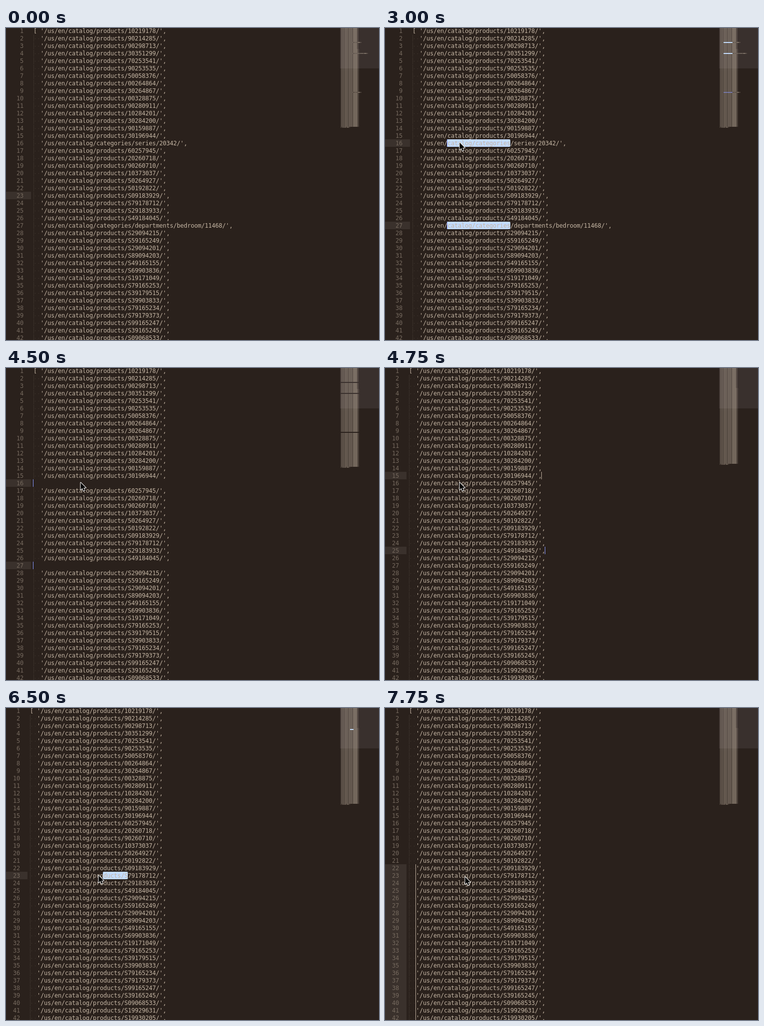
An HTML page with a canvas for the animation above (8 s loop, 747 px wide and 625 px high).

```html
<!DOCTYPE html>
<html lang="en">
<head>
<meta charset="utf-8">
<title>Editing a list with several cursors</title>
<style>
  html, body { margin: 0; width: 100%; height: 100%; overflow: hidden; background: #2a211c; }
  canvas { display: block; }
</style>
</head>
<body>
<canvas id="stage" width="747" height="625"></canvas>
<script>
const LOOP = 8000, CELL = 7, ROW = 15, TOP = -2, MAP_X = 668;
const BG = '#2a211c', INK = '#c4b5a3', DIM = '#75695e', ACTIVE = '#3a312c';
const SELECT = '#c3dcff', BLUE = '#889aff', PALE = '#bdae9d', FAINT = '#4b4139';
const ctx = document.getElementById('stage').getContext('2d');

const range = (a, b) => Array.from({ length: b - a + 1 }, (_, i) => a + i);

// Document: known ids first, then generated ones, 100 items in all
const ids = `10219178 90214285 90298713 30351299 70253541 90253535 50058376 00264864
  30264867 00328875 90280911 10284201 30284200 90159887 30196944 series/20342 60257945
  20260718 90260710 10373037 50264927 50192822 S09183929 S79178712 S29183933 S49184045
  departments/bedroom/11468 S29094215 S59165249 S29094201 S89094203 S49165155 S69903836
  S19171049 S79165253 S39179515 S39903833 S79165234 S79179373 S99165247 S39165245
  S09068533 S19929631 S19930205`.split(/\s+/);
let seed = 7;
const random = () => (seed = seed * 16807 % 2147483647) / 2147483647;
while (ids.length < 100) {
  const n = Math.floor(10000 + random() * 89999);
  ids.push(ids.length === 65 ? 'series/' + n : 'S' + n + Math.floor(100 + random() * 899));
}

const full = ids.map((id, i) => {
  const kind = id.includes('/') ? 'categories' : 'products';
  return `${i ? '  ' : '[ '}'/us/en/catalog/${kind}/${id}/',`;
});
full.push('  ... 13 more items ]');
const odd = [16, 27, 66];
const isOdd = i => odd.includes(i + 1);
const docs = {
  full,
  blank: full.map((s, i) => isOdd(i) ? '' : s),
  cut: full.filter((s, i) => !isOdd(i))
};

const carets = (rows, col, color = BLUE) => rows.map(r => [r, col, color]);
const mark = (rows, from, to) => ({ rows, from, to });
const none = mark([], 0, 0);
const tail = range(22, 97);
const cutEnds = [[15, 38, PALE], [25, 39, BLUE], [63, 39, BLUE]];

// Each step changes only the listed parts of the state before it
const steps = [
  [0, { doc: 'full', active: [23], sel: none, box: none, carets: [], mouse: null }],
  [500, { mouse: [268, 296] }],
  [750, { mouse: [232, 252] }],
  [1000, { mouse: [214, 230], active: [16], carets: [[16, 23, BLUE]] }],
  [1250, { mouse: [206, 229], sel: mark([16], 18, 28), box: mark([27, 66], 18, 28), carets: [] }],
  [1500, { mouse: [189, 229] }],
  [1750, { mouse: [166, 229], sel: mark([16], 10, 28), box: mark([27, 66], 10, 28) }],
  [2000, { mouse: [149, 229], carets: [[16, 10, BLUE]] }],
  [2500, { carets: [] }],
  [3000, { active: [16, 27], sel: mark([16, 27], 10, 28), box: mark([66], 10, 28),
           carets: carets([16, 27], 10) }],
  [3250, { active: odd, sel: mark(odd, 10, 28), box: none }],
  [3750, { sel: none, carets: [[16, 44, BLUE], [27, 57, PALE]] }],
  [4000, { sel: mark(odd, 2, 99), carets: carets(odd, 2) }],
  [4250, { sel: mark(odd, 0, 99), carets: carets(odd, 0) }],
  [4500, { doc: 'blank', sel: none }],
  [4750, { doc: 'cut', active: [15, 25, 63], carets: cutEnds }],
  [5000, { carets: [] }],
  [5250, { mouse: [176, 256] }],
  [5500, { mouse: [214, 296], carets: cutEnds }],
  [5750, { mouse: [238, 324] }],
  [6000, { mouse: [244, 331], carets: [] }],
  [6250, { mouse: [241, 332], active: [23], carets: [[23, 28, BLUE]] }],
  [6500, { mouse: [185, 335], sel: mark([23], 21, 28), carets: [] }],
  [6750, { mouse: [160, 338], sel: mark([23], 16, 28) }],
  [7250, { sel: mark([23], 2, 28), carets: [[23, 2, BLUE]] }],
  [7500, { active: tail, sel: mark(tail, 2, 28), carets: carets(tail, 2) }],
  [7750, { sel: none, carets: carets(tail, 2, PALE) }]
];
const states = [];
steps.forEach(([, change], i) => states.push({ ...states[i - 1], ...change }));

const rowTop = line => TOP + (line - 1) * ROW;

function rect(color, x, y, w, h) {
  ctx.fillStyle = color;
  ctx.fillRect(x, y, w, h);
}

function write(text, x, line, color) {
  ctx.fillStyle = color;
  for (let i = 0; i < text.length; i++) {
    if (text[i] !== ' ') ctx.fillText(text[i], x + i * CELL, rowTop(line) + 12);
  }
}

function eachMark({ rows, from, to }, lines, draw) {
  for (const line of rows) {
    const end = Math.min(to, lines[line - 1].length);
    if (end > from) draw(line, from, end - from);
  }
}

function drawText(s, lines) {
  const x0 = lines.length > 99 ? 55 : 48;
  for (const line of s.active) rect(ACTIVE, 0, rowTop(line), x0 - 5, ROW);

  eachMark(s.sel, lines, (line, col, n) => {
    ctx.fillStyle = SELECT;
    ctx.beginPath();
    ctx.roundRect(x0 + col * CELL - 1, rowTop(line), n * CELL + 1, ROW, 2);
    ctx.fill();
  });

  ctx.font = '12px "DejaVu Sans Mono", Menlo, monospace';
  for (let line = 1; line <= 42; line++) {
    const text = lines[line - 1], label = String(line), y = rowTop(line);
    write(label, x0 - 20 - label.length * CELL, line, DIM);
    write(text, x0, line, INK);
    if (!text || line === 1) continue;
    for (let i = 1; i < ROW; i += 2) rect(FAINT, x0, y + i, 1, 1);
    rect(FAINT, x0 + 3, y + 8, 1, 1);
    rect(FAINT, x0 + 10, y + 8, 1, 1);
  }

  ctx.strokeStyle = '#7380d0';
  ctx.lineWidth = 1;
  eachMark(s.box, lines, (line, col, n) => {
    ctx.beginPath();
    ctx.roundRect(x0 + col * CELL - .5, rowTop(line) + .5, n * CELL, ROW - 1, 2);
    ctx.stroke();
  });
  for (const [line, col, color] of s.carets) {
    rect(color, x0 + col * CELL - 1, rowTop(line), 1, ROW);
  }
}

function drawMap(s, lines) {
  rect('#39302d', 669, 0, 78, 81);
  lines.forEach((text, i) => {
    const y = i * 2 - 2;
    for (let c = 0; c < text.length; c++) {
      const ch = text[c];
      if (ch === ' ') continue;
      const a = /[0-9S]/.test(ch) ? .58 : /[a-z]/.test(ch) ? .46 : .24;
      rect(`rgba(189,174,157,${a})`, MAP_X + c, y, 1, 1);
      rect(`rgba(189,174,157,${a * .72})`, MAP_X + c, y + 1, 1, 1);
    }
  });
  const strip = color => (line, col, n) => rect(color, MAP_X + col, line * 2 - 4, n, 2);
  eachMark(s.box, lines, strip('rgba(136,154,255,.5)'));
  eachMark(s.sel, lines, strip(SELECT));
}

const arrow = new Path2D('M0 0V14.5L3.4 11.3L5.6 16.6L8 15.6L5.8 10.4H10.4Z');
function drawMouse([x, y]) {
  ctx.save();
  ctx.translate(x + .5, y + .5);
  ctx.lineJoin = 'round';
  ctx.lineWidth = 2;
  ctx.strokeStyle = '#fff';
  ctx.stroke(arrow);
  ctx.fillStyle = '#000';
  ctx.fill(arrow);
  ctx.restore();
}

function draw(s) {
  const lines = docs[s.doc];
  rect(BG, 0, 0, 747, 625);
  drawText(s, lines);
  drawMap(s, lines);
  if (s.mouse) drawMouse(s.mouse);
}

let shown = -1;
const start = performance.now();
function tick() {
  const t = (performance.now() - start) % LOOP;
  const now = steps.filter(([at]) => at <= t).length - 1;
  if (now !== shown) draw(states[shown = now]);
  requestAnimationFrame(tick);
}
tick();
</script>
</body>
</html>
```
